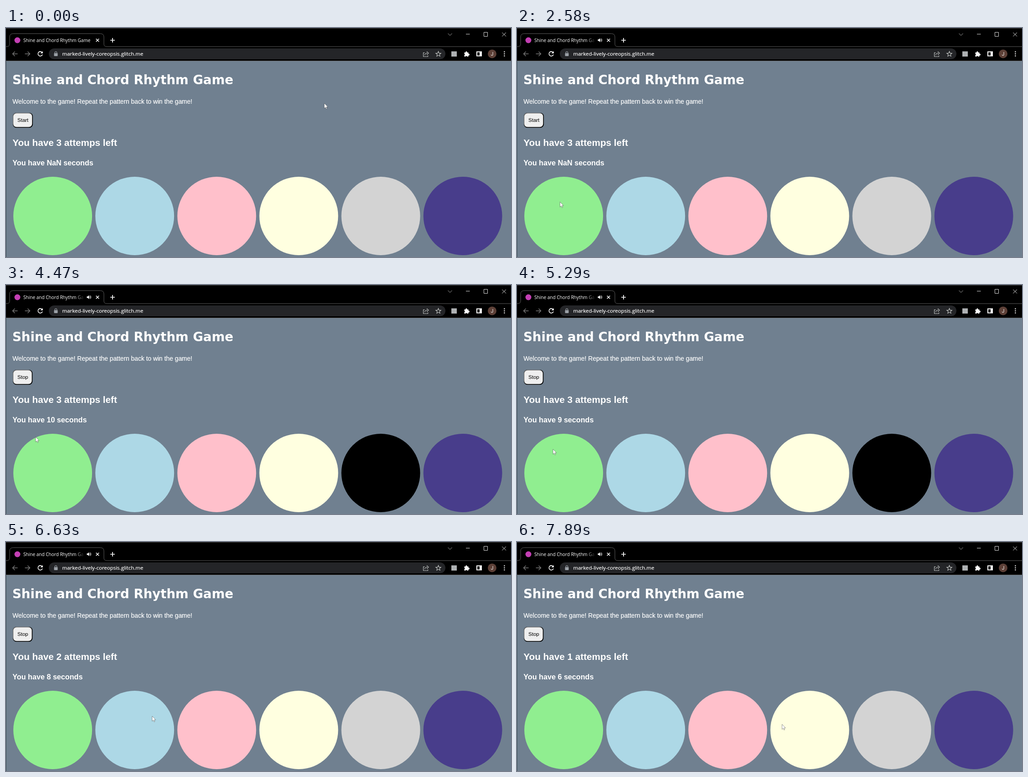
An HTML page that plays this animation: 1109x505 px, repeating every 8000 ms.

```html
<!DOCTYPE html>
<html lang="en">
<head>
<meta charset="utf-8">
<title>Shine and Chord Rhythm Game</title>
<style>
  html, body { margin: 0; width: 100%; height: 100%; overflow: hidden; background: #708090; }
  svg { display: block; width: 1109px; height: 505px; }
  text { fill: #fff; white-space: pre; }
  .ui { font-family: "Open Sans", "Noto Sans", sans-serif; }
  .page { font-family: "Liberation Sans", Arial, sans-serif; }
  .bold { font-weight: 700; }
  .firm { stroke: #fff; stroke-width: .2px; }
  .line { fill: none; stroke: #fff; }
</style>
</head>
<body>
<svg viewBox="0 0 1109 505" xmlns="http://www.w3.org/2000/svg">
  <defs>
    <linearGradient id="fade" gradientUnits="userSpaceOnUse" x1="152" x2="172" y1="0" y2="0">
      <stop offset="0" stop-color="#fff"/>
      <stop offset="1" stop-color="#fff" stop-opacity="0"/>
    </linearGradient>
  </defs>

  <!-- browser window -->
  <rect width="1109" height="505" fill="#708090"/>
  <rect width="1109" height="73" fill="#000"/>
  <path d="M0 .5H1109" stroke="#444"/>
  <path d="M0 72.5H1109" stroke="#5c5c5c"/>
  <path d="M.5 73V505" stroke="#3c5058"/>
  <path class="line" style="stroke:#5c5c5c" d="M0 41H2Q8 41 8 35V20Q8 12.5 15.500 12.500H207.500Q215 12.500 215 20V35Q215 41 221 41H1109"/>

  <!-- tab -->
  <circle cx="25" cy="27" r="6.500" fill="#c43fb4"/>
  <text id="tab" class="ui" x="38" y="30.500" font-size="10.050"></text>
  <g id="sound">
    <path d="M177.500 25.200H179.700L182.600 22.600V31.200L179.700 28.600H177.500Z" fill="#fff"/>
    <path class="line" d="M184 24.900Q185.400 26.900 184 28.900M185 23Q188.200 26.900 185 30.800"/>
  </g>
  <path class="line" stroke-width="1.500" d="M197.700 23.700L204.300 30.300M204.300 23.700L197.700 30.300"/>
  <path class="line" stroke-width="1.700" d="M229 27H239M234 22V32"/>
  <path class="line" style="stroke:#aaa" d="M970.500 12L975 16.500L979.500 12"/>
  <path class="line" style="stroke:#ddd" d="M1010 13.500H1018.500M1049.500 9.500H1057.500V18.500H1049.500ZM1089.500 10L1098 18.500M1098 10L1089.500 18.500"/>

  <!-- toolbar -->
  <path class="line" style="stroke:#777" stroke-width="1.400" d="M25.500 57H14.500M19.500 52L14.500 57L19.500 62M41.500 57H52.500M47.500 52L52.500 57L47.500 62"/>
  <path class="line" stroke-width="1.600" d="M79 53.500A5 5 0 1 0 80 58.500"/>
  <path d="M80.700 51V56H75.700Z" fill="#fff"/>
  <rect x="94" y="45" width="871" height="24" rx="12" fill="#242528"/>
  <rect x="105.500" y="55.500" width="8" height="6.500" rx="1" fill="#9aa0a6"/>
  <path class="line" style="stroke:#9aa0a6" stroke-width="1.200" d="M107.300 56V54.200A2.200 2.200 0 0 1 111.700 54.200V56"/>
  <text class="ui firm" x="123.500" y="61.200" font-size="11.480">marked-lively-coreopsis.glitch.me</text>
  <g class="line" style="stroke:#c4c7c5" stroke-width="1.100">
    <path d="M919.500 54.500H916.500V63H926.500V60.500M919.500 60Q920 55.500 925 55.500M924 52L928 55.500L924 59"/>
    <path id="star"/>
  </g>
  <rect x="978" y="51.500" width="12" height="11.500" fill="#aeb1b3"/>
  <path d="M1006.500 54H1009.200A1.900 1.900 0 1 1 1012.800 54H1015.500V56.800A1.900 1.900 0 1 1 1015.500 60.400V63H1012.500A1.700 1.700 0 0 0 1009.300 63H1006.500V60A1.700 1.700 0 0 0 1006.500 56.800Z" fill="#fff"/>
  <path d="M1033 51.500H1045V62.500H1033ZM1035 53.500V60.500H1040V53.500Z" fill="#fff" fill-rule="evenodd"/>
  <circle cx="1067.500" cy="57" r="9.500" fill="#5d4037"/>
  <text x="1067.500" y="60.500" font-size="10" font-family="Roboto, sans-serif" text-anchor="middle">J</text>
  <path d="M1094.500 52.500V52.510M1094.500 57V57.010M1094.500 61.500V61.510" stroke="#fff" stroke-width="2.500" stroke-linecap="round"/>

  <!-- page -->
  <text class="bold" x="14" y="123.500" font-size="27.600" font-family="DejaVu Sans, Verdana, sans-serif">Shine and Chord Rhythm Game</text>
  <g class="page">
    <text class="firm" x="14.300" y="167" font-size="13.830">Welcome to the game! Repeat the pattern back to win the game!</text>
    <rect id="edge" x="15" y="187" height="33" rx="8" fill="#000"/>
    <rect id="rim" x="15" y="187" height="31.500" rx="8" fill="#6b6b6b"/>
    <rect id="face" x="16.200" y="188.200" height="30" rx="7" fill="#efefef"/>
    <text id="label" x="25" y="207" font-size="11.520" style="fill:#000"></text>
    <text id="tries" class="bold" x="14.300" y="260" font-size="20.700"></text>
    <text id="clock" class="bold" x="14.300" y="303" font-size="16.170"></text>
  </g>
  <g id="pads"></g>
  <path id="cursor" d="M0 0V11.200L2.600 8.800L4.300 12.600L6 11.900L4.400 8.100H7.800Z" fill="#fff" stroke="#333" stroke-width=".5"/>
</svg>
<script>
const LOOP = 8000;
const TITLE = 'Shine and Chord Rhythm Game';
const $ = id => document.getElementById(id);
const setText = (id, value) => {
  if ($(id).textContent !== value) $(id).textContent = value;
};

// idle colour, pressed colour, press start, press end
const pads = [
  ['lightgreen', 'green', 1600, 2030],
  ['lightblue', 'blue', 6510, 6630],
  ['pink', 'red', 7120, 7400],
  ['lightyellow'],
  ['lightgray', 'black', 4470, 5440],
  ['darkslateblue']
];

// first step, last step, number of steps, end x, end y
const home = [699, 166];
const moves = [
  [280, 1170, 7, 105, 417],
  [2580, 3000, 4, 37, 203],
  [3400, 3530, 2, 45, 241],
  [3680, 3680, 1, 65, 335],
  [5000, 5290, 3, 79, 362],
  [5410, 5560, 2, 83, 370],
  [5870, 6230, 4, 321, 384],
  [6760, 7000, 3, 478, 390],
  [7520, 7890, 4, 582, 402]
];

const dots = pads.map((pad, i) => {
  const dot = document.createElementNS('http://www.w3.org/2000/svg', 'circle');
  dot.setAttribute('cx', 102.6 + 180.1 * i);
  dot.setAttribute('cy', 414.5);
  dot.setAttribute('r', 86.5);
  return $('pads').appendChild(dot);
});

$('star').setAttribute('d', 'M' + Array.from({ length: 10 }, (_, i) => {
  const r = i % 2 ? 2.6 : 6, a = i * Math.PI / 5;
  return (949.5 + r * Math.sin(a)).toFixed(2) + ' ' + (57.5 - r * Math.cos(a)).toFixed(2);
}).join('L') + 'Z');

const ease = p => p * p * (3 - 2 * p);

function cursorAt(t) {
  let [x, y] = home;
  for (const [start, end, steps, toX, toY] of moves) {
    if (t < start) break;
    const gap = (end - start) / (steps - 1 || 1);
    const done = t >= end ? steps : Math.floor((t - start) / gap) + 1;
    const p = ease(done / steps);
    x += (toX - x) * p;
    y += (toY - y) * p;
  }
  return [x, y];
}

function draw(t) {
  const sound = t >= 2160, running = t >= 3130;
  setText('tab', sound ? TITLE.slice(0, -2) : TITLE);
  $('tab').style.fill = sound ? 'url(#fade)' : '#fff';
  $('sound').style.display = sound ? '' : 'none';

  setText('label', running ? 'Stop' : 'Start');
  const width = running ? 43.3 : 44;
  $('edge').setAttribute('width', width);
  $('rim').setAttribute('width', width - 1.5);
  $('face').setAttribute('width', width - 3);

  const tries = t < 6630 ? 3 : t < 7400 ? 2 : 1;
  setText('tries', `You have ${tries} attemps left`);
  const left = t < 3870 ? 'NaN' : 10 - Math.floor((t - 3870) / 1000);
  setText('clock', `You have ${left} seconds`);

  pads.forEach(([idle, lit, from, to], i) => {
    dots[i].setAttribute('fill', t >= from && t < to ? lit : idle);
  });
  $('cursor').setAttribute('transform', `translate(${cursorAt(t)})`);
}

const begin = performance.now();
function tick() {
  draw((performance.now() - begin) % LOOP);
  requestAnimationFrame(tick);
}
tick();
</script>
</body>
</html>
```
